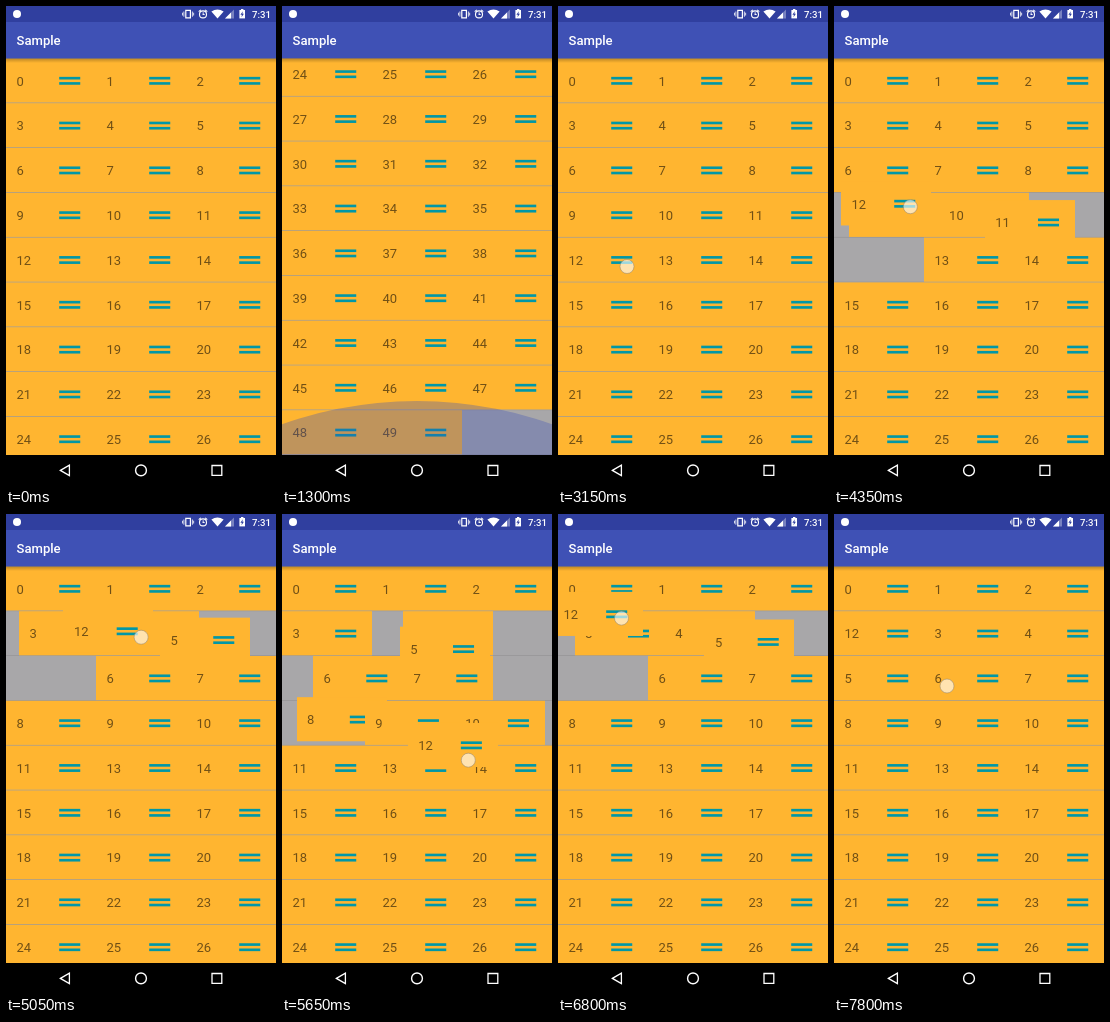
These frames come from a looping animation (270x480 px, 8 s). An HTML page with a canvas:

```html
<!DOCTYPE html>
<html lang="en">
<head>
<meta charset="utf-8">
<title>Sample</title>
<style>
html, body { margin: 0; width: 100%; height: 100%; overflow: hidden; background: #000; }
canvas { display: block; width: 270px; height: 480px; }
</style>
</head>
<body>
<canvas id="stage"></canvas>
<script>
const W = 270, H = 480, LOOP = 8000;
const TOP = 52.4, BOTTOM = 449;
const COLS = 3, COUNT = 50, DRAGGED = 12;
const CELL_W = 90, CELL_H = 44.8, DIVIDER = 0.7;
const ROWS = Math.ceil(COUNT / COLS);
const MAX_SCROLL = TOP + ROWS * CELL_H - BOTTOM;
const FONT = 'Roboto, "Noto Sans", sans-serif';
const BLUE = '#3f51b5', DARK_BLUE = '#303f9f', TEAL = '#0097a7', WHITE = '#fff';

const canvas = document.getElementById('stage');
const ratio = window.devicePixelRatio || 1;
canvas.width = W * ratio;
canvas.height = H * ratio;
const ctx = canvas.getContext('2d');
ctx.scale(ratio, ratio);

// Key points of the drag: [time, left, top] of the held cell
const PATH = [
  [3470, 0, 232], [4150, 2, 206], [4350, 7, 175.5], [4600, 10, 137],
  [4960, 28, 99], [5160, 100, 98], [5500, 172, 142], [5650, 126, 208.5],
  [5700, 105, 226], [5900, 45, 231], [6250, 2, 187], [6700, -3, 105],
  [6800, -5, 78], [6950, -9, 71]
];
const PRESS = 3100, RELEASE = 6950, SETTLE_MS = 250, MOVE_MS = 250;

const clamp = v => Math.max(0, Math.min(1, v));
const mix = (a, b, u) => a + (b - a) * u;
const ease = u => (1 - Math.cos(Math.PI * clamp(u))) / 2;
const decel = u => 1 - (1 - clamp(u)) ** 2;

const rowTop = row => TOP + row * CELL_H;
const slotPos = s => [s % COLS * CELL_W, rowTop(Math.floor(s / COLS))];

// Smooth curve through PATH
function pathPos(t) {
  const last = PATH.length - 1;
  const time = Math.max(PATH[0][0], Math.min(PATH[last][0], t));
  let i = 0;
  while (i < last - 1 && PATH[i + 1][0] < time) i++;
  const a = PATH[i], b = PATH[i + 1];
  const before = PATH[Math.max(0, i - 1)], after = PATH[Math.min(last, i + 2)];
  const d = b[0] - a[0], u = (time - a[0]) / d;
  const slope = (p, q, k) => (q[k] - p[k]) / (q[0] - p[0]) * d;
  return [1, 2].map(k =>
    mix(a[k], b[k], u * u * (3 - 2 * u))
    + u * (1 - u) ** 2 * slope(before, b, k)
    - u * u * (1 - u) * slope(a, after, k));
}

// The held cell claims a slot once it passes that slot's far edge
function findMoves() {
  const moves = [];
  let row = DRAGGED / COLS, col = 0;
  for (let t = PATH[0][0]; t < RELEASE; t++) {
    const [x, y] = pathPos(t);
    const dy = (y > rowTop(row + 1)) - (y < rowTop(row - 1));
    const dx = (x > (col + 1) * CELL_W) - (x < (col - 1) * CELL_W);
    if (!dx && !dy) continue;
    row += dy;
    col = dy ? Math.max(0, Math.round(x / CELL_W)) : Math.max(0, col + dx);
    const slot = row * COLS + col;
    if (!moves.length || moves[moves.length - 1].slot !== slot) moves.push({ t, slot });
  }
  return moves;
}
const MOVES = findMoves();

function itemPos(item, t) {
  let slot = item, from = slotPos(item), start = -MOVE_MS;
  const at = time => {
    const u = ease((time - start) / MOVE_MS), to = slotPos(slot);
    return [mix(from[0], to[0], u), mix(from[1], to[1], u)];
  };
  for (const move of MOVES) {
    if (move.t > t) break;
    const next = item < DRAGGED && item >= move.slot ? item + 1 : item;
    if (next === slot) continue;
    from = at(move.t);
    slot = next;
    start = move.t;
  }
  return at(t);
}

function draggedPos(t) {
  if (t < PATH[0][0]) return slotPos(DRAGGED);
  const [x, y] = pathPos(t);
  const [endX, endY] = slotPos(MOVES[MOVES.length - 1].slot);
  const u = ease((t - RELEASE) / SETTLE_MS);
  return [mix(x, endX, u), mix(y, endY, u)];
}

// Each fling speeds up until it hits the end of the list
const fling = (t, start, ms) => clamp((t - start) / ms) ** 1.5;
const scrollAt = t => MAX_SCROLL * (fling(t, 720, 310) - fling(t, 1740, 330));

function rect(x, y, w, h, color) {
  ctx.fillStyle = color;
  ctx.fillRect(x, y, w, h);
}

function paint(color, line) {
  ctx.lineWidth = line;
  ctx.fillStyle = ctx.strokeStyle = color;
  if (line) ctx.stroke();
  else ctx.fill();
}

function shape(points, color, line) {
  ctx.beginPath();
  points.forEach(([x, y]) => ctx.lineTo(x, y));
  ctx.closePath();
  paint(color, line);
}

function disc(x, y, r, color, line) {
  ctx.beginPath();
  ctx.arc(x, y, r, 0, Math.PI * 2);
  paint(color, line);
}

function box(x, y, w, h, line) {
  ctx.beginPath();
  ctx.rect(x, y, w, h);
  paint(WHITE, line);
}

function label(str, x, y, size, color, weight = 400, align = 'left') {
  ctx.font = `${weight} ${size}px ${FONT}`;
  ctx.textAlign = align;
  ctx.fillStyle = color;
  ctx.fillText(str, x, y);
}

function cell(item, [x, y]) {
  if (y > BOTTOM || y + CELL_H < TOP) return;
  rect(Math.round(x), y, CELL_W, CELL_H - DIVIDER, '#ffb530');
  const mid = y + CELL_H / 2, bar = 2.63;
  label(item, x + 10.5, mid + 4.8, 13, 'rgba(0,0,0,.56)');
  for (const top of [-1.5, 0.5]) rect(x + 53.2, mid + top * bar, bar * 8, bar, TEAL);
}

// Overscroll glow, drawn from an edge; dir is 1 for top, -1 for bottom
function glow(t, hit, rise, peak, edge, dir) {
  const fade = (t - hit - rise) / 600;
  if (t < hit || fade >= 1) return;
  const v = fade < 0 ? decel((t - hit) / rise) : 1 - decel(fade);
  const r = W * 1.5, depth = W / 5;
  ctx.save();
  ctx.translate(0, edge);
  ctx.scale(1, dir * Math.min(1, v * peak));
  ctx.globalAlpha = 0.5 * v;
  disc(W / 2, depth - r, r, BLUE);
  ctx.restore();
}

function list(t) {
  ctx.save();
  ctx.beginPath();
  ctx.rect(0, 52, W, BOTTOM - 52);
  ctx.clip();
  rect(0, 52, W, BOTTOM - 52, '#a8a7a9');
  ctx.translate(0, -scrollAt(t));
  const seen = ([x, y]) => [x, y];
  for (let row = 1; row <= ROWS; row++) {
    rect(0, rowTop(row) - DIVIDER, W, DIVIDER, 'rgba(0,0,0,.12)');
  }
  for (let i = 0; i < COUNT; i++) {
    if (i !== DRAGGED) scrolledCell(i, itemPos(i, t));
  }
  scrolledCell(DRAGGED, draggedPos(t));
  ctx.restore();
}

function scrolledCell(item, [x, y]) {
  const scroll = scrollNow;
  ctx.save();
  ctx.translate(0, scroll);
  cell(item, [x, y - scroll]);
  ctx.restore();
}
let scrollNow = 0;

function listEdges(t) {
  ctx.save();
  ctx.beginPath();
  ctx.rect(0, 52, W, BOTTOM - 52);
  ctx.clip();
  glow(t, 1030, 160, 1.6, BOTTOM, -1);
  glow(t, 2070, 210, 0.98, TOP, 1);
  const shade = ctx.createLinearGradient(0, 52, 0, 57);
  shade.addColorStop(0, 'rgba(0,0,0,.28)');
  shade.addColorStop(1, 'rgba(0,0,0,0)');
  rect(0, 52, W, 5, shade);
  ctx.restore();
}

function touch(x, y) {
  disc(x, y, 7, 'rgba(255,255,255,.62)');
  disc(x, y, 7, 'rgba(140,130,115,.55)', 0.9);
}

function statusBar() {
  rect(0, 0, W, 16, DARK_BLUE);
  disc(11, 8, 4, WHITE);
  // vibrate
  box(179.8, 4.4, 4.6, 7.4, 1.2);
  for (const side of [-1, 1]) {
    rect(181.7 + side * 4.2, 5.5, 0.8, 5.2, WHITE);
    rect(181.7 + side * 5.6, 6.7, 0.8, 2.8, WHITE);
  }
  // alarm
  disc(197, 8.4, 3.5, WHITE, 1.1);
  rect(196.7, 6.3, 0.9, 2.6, WHITE);
  rect(196.7, 8.1, 2, 0.9, WHITE);
  for (const side of [-1, 1]) {
    shape([[197 + side * 4.3, 5.6], [197 + side * 2.2, 3.8]], WHITE, 1.1);
  }
  // wifi
  ctx.beginPath();
  ctx.moveTo(211.5, 12.4);
  ctx.lineTo(205.4, 5.4);
  ctx.quadraticCurveTo(211.5, 1.6, 217.6, 5.4);
  paint(WHITE);
  // signal
  const wedge = (size, color) => shape([[219, 12.4], [219 + size, 12.4], [219 + size, 12.4 - size]], color);
  wedge(9, 'rgba(255,255,255,.35)');
  wedge(6, WHITE);
  // battery
  rect(233.4, 4, 5.6, 8.4, WHITE);
  rect(235, 3, 2.4, 1.2, WHITE);
  shape([[236.8, 5.2], [234.4, 8.8], [235.9, 8.8], [235.5, 11.2], [237.9, 7.7], [236.4, 7.7]], DARK_BLUE);
  label('7:31', 265, 11.6, 9.6, WHITE, 500, 'right');
}

function navBar() {
  const mid = 464.4;
  rect(0, BOTTOM, W, H - BOTTOM, '#000');
  shape([[54.4, mid], [63.4, mid - 5.2], [63.4, mid + 5.2]], WHITE, 1.3);
  disc(135, mid, 5.4, WHITE, 1.4);
  box(206, mid - 4.9, 9.8, 9.8, 1.3);
}

function draw(t) {
  scrollNow = scrollAt(t);
  list(t);
  listEdges(t);
  rect(0, 16, W, 36.4, BLUE);
  label('Sample', 10.5, 39.2, 13.1, WHITE, 500);
  statusBar();
  navBar();
  if (t >= PRESS && t < RELEASE) {
    const [x, y] = pathPos(t + 20);
    touch(x + 69, y + 28.5);
  } else if (t >= 7800) {
    touch(113, 172);
  }
}

const begin = performance.now();
function frame() {
  draw((performance.now() - begin) % LOOP);
  requestAnimationFrame(frame);
}
frame();
</script>
</body>
</html>
```
